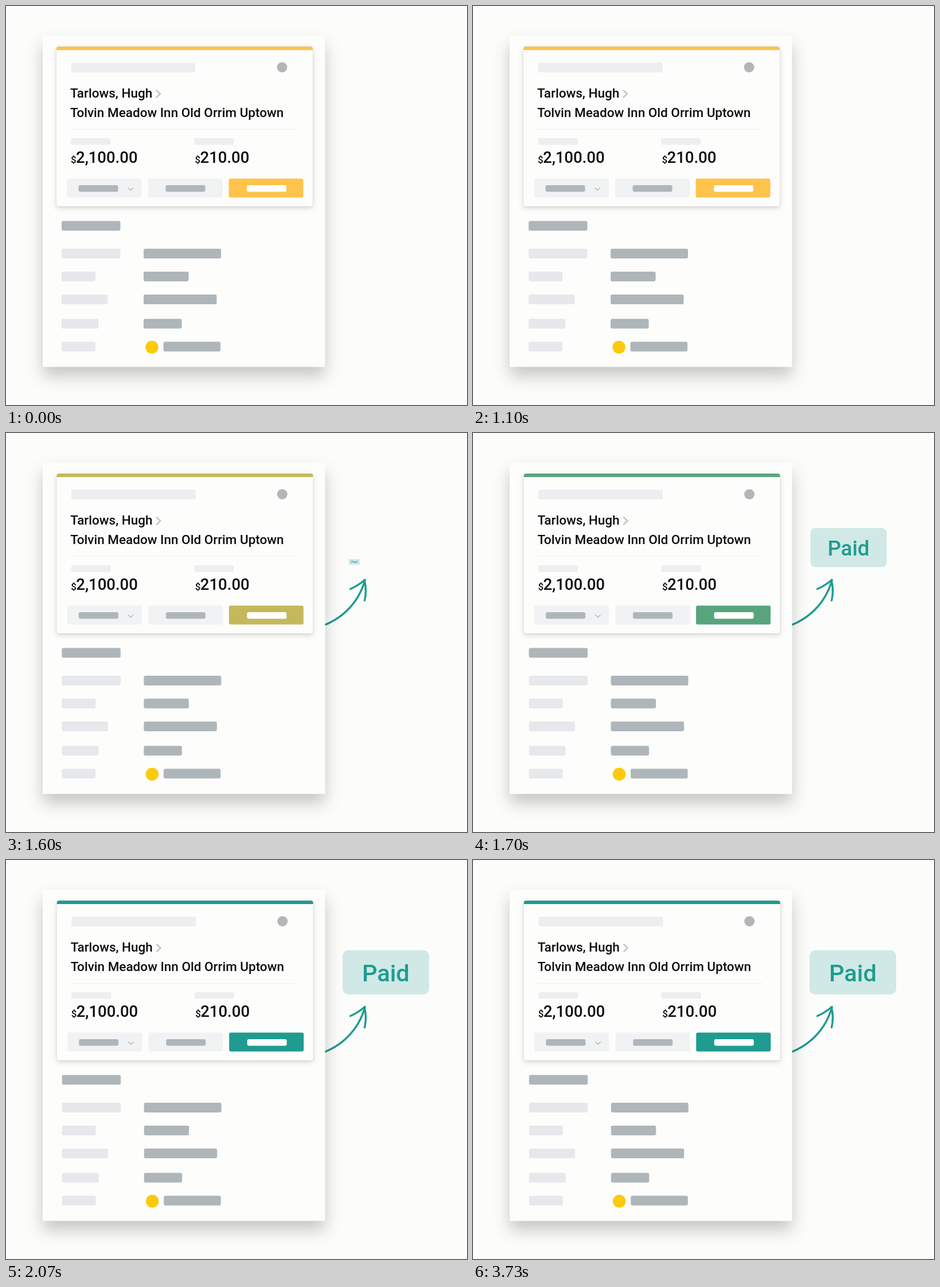
An HTML page that plays this animation: 804 by 697 pixels, repeating every 4.11 s.

```html
<!DOCTYPE html>
<html lang="en">
<head>
<meta charset="utf-8">
<title>Payment card</title>
<style>
  html, body { margin: 0; width: 100%; height: 100%; overflow: hidden; background: #fcfcfa; }
  svg { display: block; width: 100%; height: 100%; }
  text { font-family: Roboto, sans-serif; font-weight: 500; fill: #0b0c0f; }
  .page { fill: #fdfdfc; filter: drop-shadow(0 16px 14px rgba(0, 0, 0, .21)); }
  .card { fill: #fdfdfc; filter: drop-shadow(0 3px 5px rgba(0, 0, 0, .15)) drop-shadow(0 0 1px rgba(0, 0, 0, .12)); }
  .line { fill: none; stroke-linecap: round; stroke-linejoin: round; }
  .title { font-size: 22.5px; }
  .price { font-size: 27.5px; }
  .unit { font-size: 17px; }
  #arrow { stroke: #1f9b8f; stroke-width: 3.4; }
  #badge rect { fill: #d0e9e6; }
  #badge text { font-size: 41.5px; fill: #1f9b8f; }
</style>
</head>
<body>
<svg viewBox="0 0 804 697">
  <g id="arrow" class="line">
    <path pathLength="1" d="M545 339 C585 327 615 297 626 257"/>
    <path pathLength="1" d="M626 256.500 C617 264 609 269 600.500 272.500"/>
    <path pathLength="1" d="M625 257 C628 268 628 281 625.500 292.500"/>
  </g>
  <rect class="page" x="64" y="52" width="492.500" height="578.500"/>
  <g id="content">
    <rect class="card" x="88" y="71" width="447" height="279" rx="4"/>
    <path class="accent" d="M88 77 V75 Q88 71 92 71 H531 Q535 71 535 75 V77 Z"/>
    <circle cx="481.500" cy="107" r="9" fill="#b3b6b8"/>
    <text class="title" x="112" y="159.500">Tarlows, Hugh</text>
    <path class="line" d="M262.500 147.500 L269 153.500 L262.500 159.500" stroke="#c3c6c9" stroke-width="2.600"/>
    <text class="title" x="112" y="193.500">Tolvin Meadow Inn Old Orrim Uptown</text>
    <path d="M112 215.500 H504" stroke="#efeee8"/>
    <text class="unit" x="113" y="273.500">$</text>
    <text class="price" x="122" y="273.500">2,100.00</text>
    <text class="unit" x="329.500" y="273.500">$</text>
    <text class="price" x="338.500" y="273.500">210.00</text>
    <g id="bars"></g>
    <path class="line" d="M213 318 L217.200 322 L221.400 318" stroke="#b5babd" stroke-width="1.600"/>
    <circle cx="254.500" cy="596" r="11.200" fill="#fdc90b"/>
  </g>
  <g id="badge">
    <rect x="587" y="157.500" width="151" height="77.500" rx="10"/>
    <text x="621" y="212">Paid</text>
  </g>
</svg>
<script>
const LOOP = 4110;
const DARK = '#afb6b9', LIGHT = '#e6e8eb', PALE = '#eceeef', BUTTON = '#f1f2f3';
const AMBER = [255, 194, 74], TEAL = [31, 155, 143];
const PIVOT = [599.2, 229.5];
const $ = id => document.getElementById(id);

function bar(x, y, w, h, fill, cls = '') {
  const el = document.createElementNS('http://www.w3.org/2000/svg', 'rect');
  const attrs = { x, y, width: w, height: h, rx: 3, fill, class: cls };
  for (const key in attrs) el.setAttribute(key, attrs[key]);
  $('bars').append(el);
}

bar(113.5, 99, 217, 17, PALE);
bar(113.5, 231, 69, 11.5, PALE);
bar(328, 231, 69, 11.5, PALE);
[[106.5, 126.5], [248, 278.5], [388.5, 420]].forEach(([x, inner], i) => {
  bar(x, 301.5, 130, 33, BUTTON, i === 2 ? 'accent' : '');
  bar(inner, 313, 69, 11.5, i === 2 ? '#fff' : DARK);
});
bar(97, 375.5, 102.5, 17, DARK);
[
  [424, 102.5, 240, 135],
  [464, 59, 240, 78.5],
  [504, 80.5, 240, 127.5],
  [546.5, 64, 240, 66.5],
  [586.5, 59, 274.5, 99.5]
].forEach(([y, label, x, value]) => {
  bar(97, y, label, 17, LIGHT);
  bar(x, y, value, 17, DARK);
});

const accents = document.querySelectorAll('.accent');
const strokes = document.querySelectorAll('#arrow path');
const progress = (t, from, to) => Math.min(1, Math.max(0, (t - from) / (to - from)));
const smooth = u => u * u * (3 - 2 * u);

// Damped spring from 0 to 1 with a small overshoot
function spring(ms) {
  if (ms <= 0) return 0;
  const w = Math.PI / 228, damp = 1.245;
  return 1 - Math.exp(-damp * w * ms) * (Math.cos(w * ms) + damp * Math.sin(w * ms));
}

function draw(t) {
  const mix = smooth(progress(t, 1500, 1800));
  const color = `rgb(${AMBER.map((c, i) => Math.round(c + (TEAL[i] - c) * mix))})`;
  accents.forEach(el => { el.style.fill = color; });

  strokes.forEach((el, i) => {
    const p = i ? smooth(progress(t, 1370, 1530)) : smooth(progress(t, 1080, 1400));
    el.style.strokeDasharray = `${p} 2`;
    el.style.visibility = p > 0 ? 'visible' : 'hidden';
  });

  const s = spring(t - 1574), [px, py] = PIVOT;
  $('badge').setAttribute('transform', `translate(${px} ${py}) scale(${s}) translate(${-px} ${-py})`);
  $('badge').style.visibility = s > 0 ? 'visible' : 'hidden';

  const shift = 0.7 * smooth(progress(t, 1200, 2000));
  $('content').setAttribute('transform', `translate(${shift} 0)`);
}

const start = performance.now();
function tick() {
  draw((performance.now() - start) % LOOP);
  requestAnimationFrame(tick);
}
tick();
</script>
</body>
</html>
```
